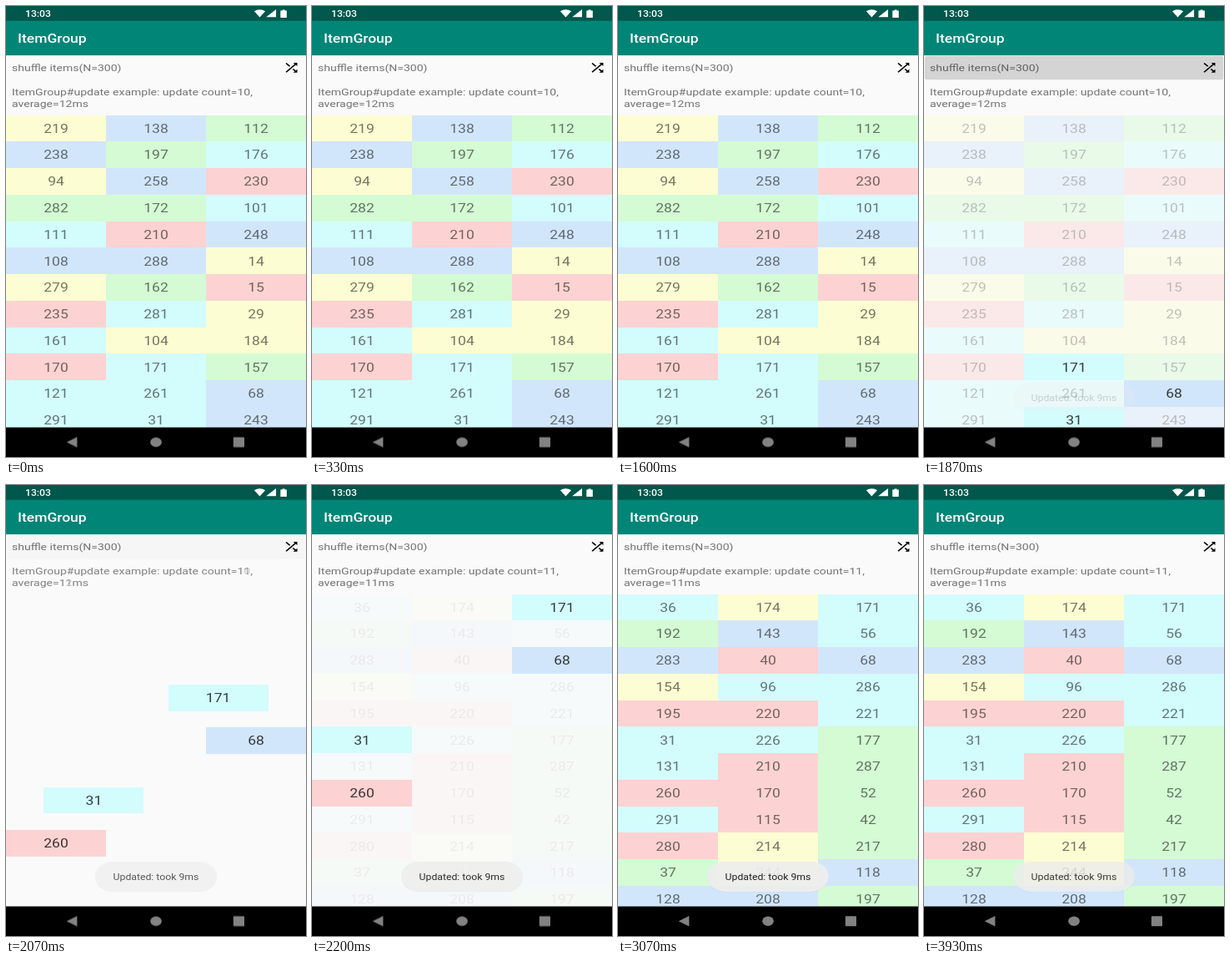
Animation, 360 px wide and 540 px high, one loop 3.99 s. Source, as an HTML page:

```html
<!DOCTYPE html>
<html lang="en">
<head>
<meta charset="utf-8">
<title>ItemGroup</title>
<style>
  html, body { margin: 0; width: 100%; height: 100%; overflow: hidden; background: #fafafa; }
  svg { display: block; width: 100vw; height: 100vh; font-family: Roboto, "Noto Sans", sans-serif; }
  .body { font-size: 16px; fill: #000; fill-opacity: .54; }
  .cell text { font-size: 20px; text-anchor: middle; fill: #000; fill-opacity: .54; }
  .moving text { fill-opacity: .76; }
</style>
</head>
<body>
<!-- Laid out in a 411 x 731 dp screen, shown on a wider aspect. -->
<svg viewBox="0 0 411 731" preserveAspectRatio="none">
  <rect width="411" height="731" fill="#fafafa"/>
  <g id="list"></g>

  <rect id="ripple" x="1" y="81" width="409" height="38.5" rx="3" fill="#d4d4d4"/>
  <text class="body" x="8" y="105.3">shuffle items(N=300)</text>
  <path transform="translate(379 88)" d="M10.59 9.17L5.41 4 4 5.41l5.17 5.17 1.42-1.41zM14.5 4l2.04 2.04L4 18.59 5.41 20 17.96 7.46 20 9.5V4h-5.5zm.33 9.41l-1.41 1.41 3.13 3.13L14.5 20H20v-5.5l-2.04 2.04-3.13-3.13z"/>
  <g id="statsBefore" class="body">
    <text x="8" y="145">ItemGroup#update example: update count=10,</text>
    <text x="8" y="163.8">average=12ms</text>
  </g>
  <g id="statsAfter" class="body">
    <text x="8" y="145">ItemGroup#update example: update count=11,</text>
    <text x="8" y="163.8">average=11ms</text>
  </g>

  <rect width="411" height="80" fill="#008577"/>
  <rect width="411" height="24" fill="#00574b"/>
  <g fill="#fff" font-weight="500">
    <text x="26.2" y="17" font-size="14">13:03</text>
    <text x="16" y="59.4" font-size="20">ItemGroup</text>
    <path d="M347.6 18.3L340 8.6Q347.6 3.2 355.2 8.6Z"/>
    <path d="M356.5 18H370V5.5Z"/>
    <path d="M376 7.5h2.6V6h3.4v1.5h2.6V19H376Z"/>
  </g>

  <g id="toast">
    <rect x="122.2" y="611.2" width="166.6" height="48.8" rx="24.4" fill="#000" opacity=".05"/>
    <rect x="122.2" y="610.3" width="166.6" height="48.8" rx="24.4" fill="#eee" opacity=".93"/>
    <text x="205.5" y="640" font-size="14" text-anchor="middle" fill="#222">Updated: took 9ms</text>
  </g>

  <rect y="683" width="411" height="48" fill="#000"/>
  <g fill="#828282">
    <path d="M83 707L97.5 698.4V715.6Z"/>
    <circle cx="205.5" cy="707" r="7.8"/>
    <rect x="311.5" y="699" width="15" height="16" rx="1"/>
  </g>
</svg>
<script>
const LOOP = 3990, STEP = 66.5;
const FADE = 120, MOVE = 250;
const REMOVE_AT = 1797, MOVE_AT = REMOVE_AT + FADE, ADD_AT = MOVE_AT + MOVE + 2;
const TOAST_IN = 1812, TOAST_OUT = 3755, TOAST_FADE = 500;

const COL = 137, ROW = 43, TOP = 176.7;
const TINTS = ['#fcd3d2', '#d3fcfd', '#d4fbd3', '#d2e6fb', '#fdfdd3'];
const before = `219 138 112 238 197 176 94 258 230 282 172 101
  111 210 248 108 288 14 279 162 15 235 281 29
  161 104 184 170 - 157 121 261 - 291 - 243`.split(/\s+/);
const after = `36 174 - 192 143 56 283 40 - 154 96 286
  195 220 221 - 226 177 131 210 287 - 170 52
  291 115 42 280 214 217 37 244 118 128 208 197`.split(/\s+/);
// Kept items travel between [column, row] slots.
const kept = [
  { n: 171, from: [1, 9], to: [2, 0] },
  { n: 68, from: [2, 10], to: [2, 2] },
  { n: 31, from: [1, 11], to: [0, 5] },
  { n: 260, from: [0, 12], to: [0, 7] }
];

const $ = id => document.getElementById(id);
const clamp = v => Math.max(0, Math.min(1, v));
const progress = (t, start, length) => clamp((t - start) / length);
const ease = p => (1 - Math.cos(Math.PI * p)) / 2;
const mix = (a, b, p) => a + (b - a) * p;

function add(parent, tag, attrs = {}) {
  const el = document.createElementNS('http://www.w3.org/2000/svg', tag);
  for (const key in attrs) el.setAttribute(key, attrs[key]);
  return parent.appendChild(el);
}

function place(cell, col, row) {
  cell.setAttribute('transform', `translate(${col * COL} ${TOP + row * ROW})`);
}

function addCell(parent, n, col, row) {
  const cell = add(parent, 'g', { class: 'cell' });
  add(cell, 'rect', { width: COL, height: ROW, fill: TINTS[n % 5], 'shape-rendering': 'crispEdges' });
  add(cell, 'text', { x: COL / 2, y: 28.7 }).textContent = n;
  place(cell, col, row);
  return cell;
}

function addPage(numbers) {
  const page = add($('list'), 'g');
  numbers.forEach((n, i) => {
    if (n !== '-') addCell(page, n, i % 3, Math.floor(i / 3));
  });
  return page;
}

const oldPage = addPage(before);
const newPage = addPage(after);
const movers = add($('list'), 'g');
for (const item of kept) item.cell = addCell(movers, item.n, ...item.from);

const fade = (el, opacity) => el.setAttribute('opacity', opacity);

function render(t) {
  fade(oldPage, 1 - ease(progress(t, REMOVE_AT, FADE)));
  fade(newPage, ease(progress(t, ADD_AT, FADE)));

  const move = ease(progress(t, MOVE_AT, MOVE));
  movers.setAttribute('class', t > REMOVE_AT && t < ADD_AT + FADE ? 'moving' : '');
  for (const { cell, from, to } of kept) {
    place(cell, mix(from[0], to[0], move), mix(from[1], to[1], move));
  }

  fade($('statsBefore'), 1 - move);
  fade($('statsAfter'), move);
  fade($('ripple'), progress(t, 1660, 120) * (1 - progress(t, 1870, 220)));

  const shown = 1 - (1 - progress(t, TOAST_IN, TOAST_FADE)) ** 2;
  fade($('toast'), shown * (1 - progress(t, TOAST_OUT, TOAST_FADE) ** 2));
}

function tick() {
  const t = performance.now() % LOOP;
  render(Math.floor(t / STEP) * STEP);
  requestAnimationFrame(tick);
}
tick();
</script>
</body>
</html>
```
